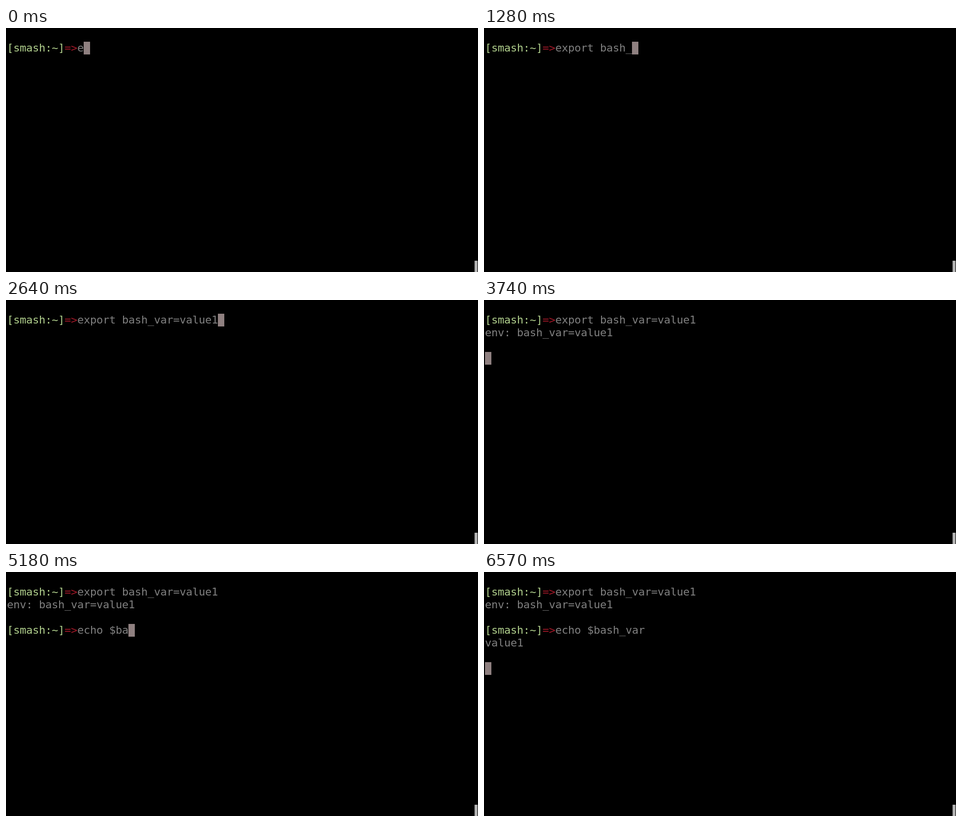
Write an HTML page that moves like this. It is 960x498 px and loops after 8 s.

```html
<!DOCTYPE html>
<html lang="en">
<head>
<meta charset="utf-8">
<title>Terminal session</title>
<style>
  html, body { margin: 0; width: 100%; height: 100%; overflow: hidden; background: #000; }
  #stage { position: relative; width: 960px; height: 498px; overflow: hidden; background: #000; }
  #screen {
    position: absolute; left: 2px; top: 28px; margin: 0; white-space: pre; color: #808080;
    font: 22px/26px "DejaVu Sans Mono", monospace;
    letter-spacing: calc(13px - 1ch);
  }
  .path { color: #b0cf8c; }
  .arrow { color: #a01828; }
  #cursor { position: absolute; left: 2px; top: 28px; width: 13px; height: 26px; background: #8f8080; }
  #bar { position: absolute; left: 953px; top: 475px; width: 6px; height: 23px; background: #b2b2b2; }
</style>
</head>
<body>
<div id="stage">
  <pre id="screen"></pre>
  <div id="cursor"></div>
  <div id="bar"></div>
</div>
<script>
const LOOP = 8000, CELL_W = 13, CELL_H = 26;
const PATH = "[smash:~]", ARROW = "=>";
const BEAT = 102; // pause between the shell's writes after Enter

// keys: [time, characters typed], with an even typing pace in between
const runs = [
  {
    command: "export bash_var=value1", output: "env: bash_var=value1", enter: 3330,
    keys: [[0, 1], [160, 2], [680, 7], [820, 8], [1040, 11], [1280, 12], [2640, 22]]
  },
  {
    command: "echo $bash_var", output: "value1", enter: 6140,
    keys: [[4180, 1], [4670, 5], [5080, 7], [5310, 10], [6050, 14]]
  }
];

const screen = document.getElementById("screen");
const cursor = document.getElementById("cursor");

function typedCount(keys, t) {
  const next = keys.findIndex(([time]) => time > t);
  if (next === 0) return 0;
  if (next < 0) return keys[keys.length - 1][1];
  const [t0, n0] = keys[next - 1], [t1, n1] = keys[next];
  return Math.floor(n0 + (n1 - n0) * (t - t0) / (t1 - t0));
}

// Everything the run has written by time t.
function transcript({ command, output, enter, keys }, t) {
  const count = typedCount(keys, t);
  if (!count) return "";
  const writes = ["\n", output, "\n", "", "\n"];
  const done = Math.max(0, Math.floor((t - enter) / BEAT) + 1);
  return PATH + ARROW + command.slice(0, count) + writes.slice(0, done).join("");
}

function span(text, name) {
  const el = document.createElement("span");
  el.textContent = text;
  el.className = name;
  return el;
}

function paint(text) {
  const parts = text.split(PATH + ARROW);
  screen.replaceChildren(parts[0]);
  for (const part of parts.slice(1)) {
    screen.append(span(PATH, "path"), span(ARROW, "arrow"), part);
  }
  const lines = text.split("\n");
  const row = lines.length - 1, col = lines[row].length;
  cursor.style.transform = `translate(${col * CELL_W}px, ${row * CELL_H}px)`;
}

let shown = null;
function draw(t) {
  const text = runs.map(run => transcript(run, t)).join("");
  if (text !== shown) paint(shown = text);
}

const start = performance.now();
function tick() {
  draw((performance.now() - start) % LOOP);
  requestAnimationFrame(tick);
}
tick();
</script>
</body>
</html>
```
